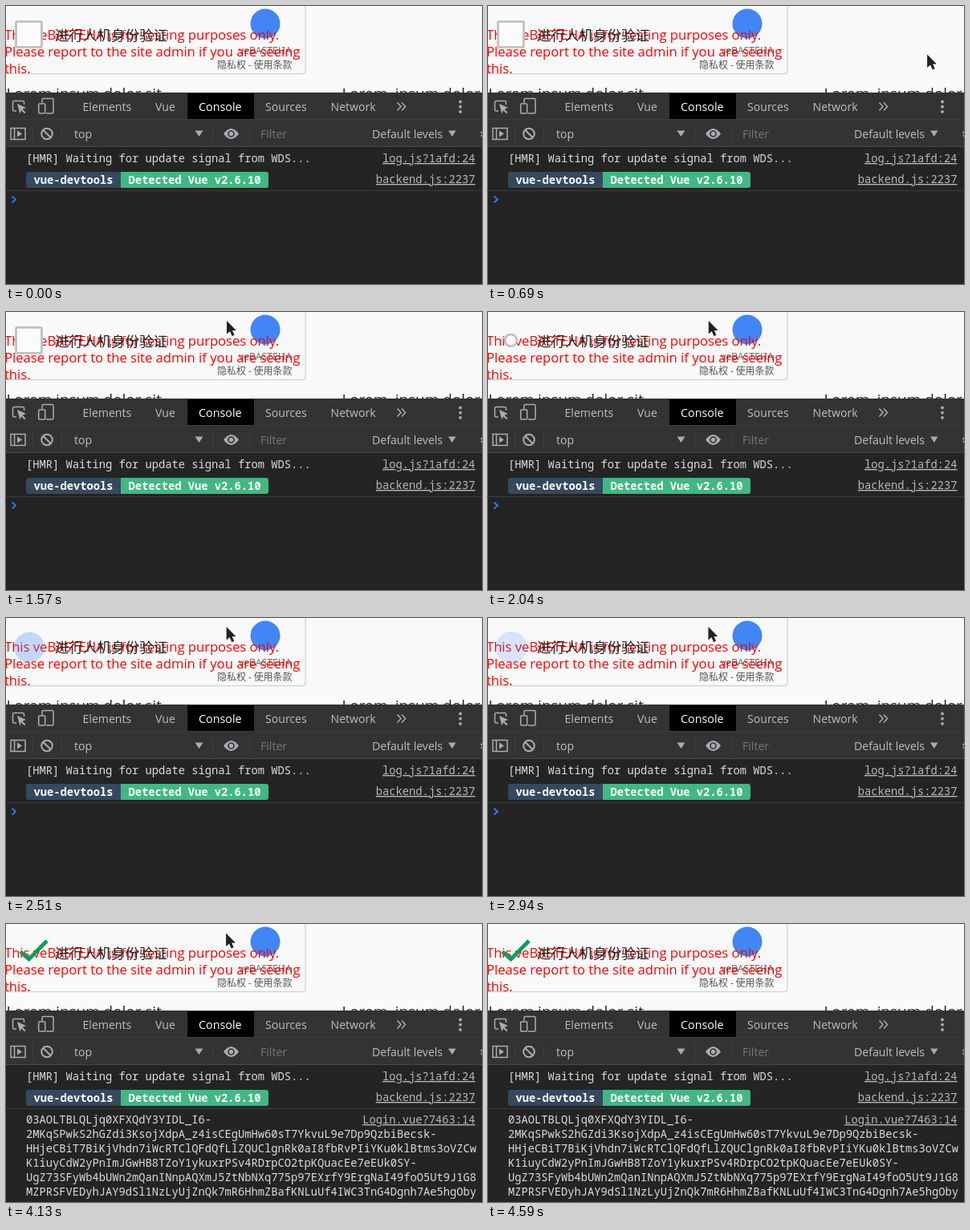
Recreate the animation shown at these times as an HTML page. Size 593 by 347 pixels, loop 5290 ms.

```html
<!DOCTYPE html>
<html lang="zh-CN">
<head>
<meta charset="utf-8">
<title>Console log</title>
<style>
html, body { margin: 0; width: 100%; height: 100%; overflow: hidden; background: #fafafa; }
svg { display: block; width: 593px; height: 347px; }
text { font-family: "Open Sans", "Noto Sans", sans-serif; white-space: pre; }
.cjk { font-family: "Noto Sans CJK SC", "Noto Sans CJK", sans-serif; }
.warn { font-size: 16.6px; fill: #f00; }
.page { font-size: 18.9px; fill: #222; }
.tool { font-size: 14.1px; fill: #bcc0c4; }
.mono { font-family: "Noto Sans Mono", "DejaVu Sans Mono", monospace; font-size: 13.75px; font-weight: 500; fill: #dcdcdc; }
.link { fill: #b8b8b8; font-weight: 400; text-anchor: end; text-decoration: underline; }
.badge { fill: #fff; font-weight: 700; }
.icon { fill: none; stroke: #a9adb2; stroke-width: 1.5; }
.solid { fill: #a9adb2; }
.rule { stroke: #3d3d3d; fill: none; }
</style>
</head>
<body>
<svg viewBox="0 0 593 347">
  <rect width="593" height="347" fill="#fafafa"/>

  <!-- verification widget -->
  <rect x="-6" y="-6" width="379" height="91.5" rx="4" fill="#000" opacity=".07"/>
  <rect x="-6" y="-6" width="379" height="90.5" rx="3.5" fill="#f9f9f9" stroke="#cfcfcf" stroke-width="1.2"/>
  <circle cx="323" cy="22" r="18.5" fill="#4285f4"/>
  <text x="290" y="60" font-size="12.3" fill="#666">veBASTEHA</text>
  <text class="cjk" x="263" y="78" font-size="12" fill="#555">隐私权 - 使用条款</text>
  <g class="warn">
    <text x="-2" y="42">This veBASTEHA is for testing purposes only.</text>
    <text x="-2" y="63">Please report to the site admin if you are seeing</text>
    <text x="-2" y="84">this.</text>
  </g>
  <text class="cjk" x="61" y="43" font-size="17.5" fill="#222">进行人机身份验证</text>
  <rect id="box" fill="#fbfbfb" stroke="#c1c1c1" stroke-width="2.8"/>
  <circle id="disc" cx="29" cy="36.7" fill="#4285f4"/>
  <path id="check" d="M18 34.500L28.500 44L51 21" pathLength="100" fill="none" stroke="#0f9d58" stroke-width="4.8" stroke-dasharray="100 200"/>
  <text class="page" x="0.500" y="115.500">Lorem ipsum dolor sit</text>
  <text class="page" x="418.500" y="115.500">Lorem, ipsum dolor</text>

  <!-- developer tools -->
  <rect y="108" width="593" height="239" fill="#242424"/>
  <rect y="108" width="593" height="68" fill="#333"/>
  <rect x="226" y="109" width="83" height="32.500" fill="#000"/>
  <path class="rule" d="M0 141.500H593M33.500 149V170M69.500 149V170M257.500 149V170M303.500 149V170"/>
  <path class="rule" d="M0 175.500H593" style="stroke:#484848"/>
  <g class="tool">
    <text x="95.500" y="131">Elements</text>
    <text x="186" y="131">Vue</text>
    <text x="240" y="131" font-size="14.3" fill="#fff">Console</text>
    <text x="323" y="131">Sources</text>
    <text x="404.500" y="131">Network</text>
    <text x="85" y="165">top</text>
    <text x="317" y="165" fill="#777">Filter</text>
    <text x="456" y="165">Default levels</text>
  </g>
  <g class="icon">
    <path d="M13 131H10Q8.500 131 8.500 129.500V120Q8.500 118.500 10 118.500H21Q22.500 118.500 22.500 120V123"/>
    <path d="M45 121V117Q45 115.500 46.500 115.500H57.500Q59 115.500 59 117V132.500Q59 134 57.500 134H50"/>
    <rect x="40.700" y="122" width="8" height="12" rx="1"/>
    <path d="M6 152.500H24V166.500H6ZM10.500 152.500V166.500"/>
    <circle cx="51" cy="159.500" r="6.800" stroke-width="2"/>
    <path d="M46.200 154.700L55.800 164.300" stroke-width="2"/>
    <path d="M487.500 120.500L492 125.500L487.500 130.500M493 120.500L497.500 125.500L493 130.500"/>
    <circle cx="597.500" cy="159.500" r="5.500" stroke-dasharray="2.600 1.720"/>
  </g>
  <g class="solid">
    <path d="M14 122L25 127L20.500 128.700L24.500 132.700L23 134.200L19 130.200L17.300 134.500Z"/>
    <path d="M14 155.500L20 159.500L14 163.500Z"/>
    <path d="M235.500 155.500H245.500L240.500 163Z"/>
    <path d="M551 155.500H560.500L555.800 163Z"/>
    <path d="M271 159.500Q280.500 146.500 290 159.500Q280.500 172.500 271 159.500Z"/>
    <circle cx="566" cy="119.500" r="1.900"/><circle cx="566" cy="125.700" r="1.900"/><circle cx="566" cy="131.900" r="1.900"/>
  </g>
  <circle cx="280.500" cy="159.500" r="3.500" fill="none" stroke="#333" stroke-width="1.700"/>

  <path class="rule" d="M0 230.500H593"/>
  <text class="mono" x="25" y="195">[HMR] Waiting for update signal from WDS...</text>
  <text class="mono link" x="584.500" y="195">log.js?1afd:24</text>
  <path d="M143 207H28Q25 207 25 210V224Q25 227 28 227H143Z" fill="#35495e"/>
  <path d="M143 207H324Q327 207 327 210V224Q327 227 324 227H143Z" fill="#41b883"/>
  <text class="mono badge" x="34.500" y="221.500">vue-devtools</text>
  <text class="mono badge" x="152.500" y="221.500">Detected Vue v2.6.10</text>
  <text class="mono link" x="584.500" y="221">backend.js:2237</text>
  <path id="prompt" d="M7.500 237.500L12 241.500L7.500 245.500" fill="none" stroke="#367cf1" stroke-width="1.800"/>
  <g id="log">
    <text class="mono link" x="584.500" y="249">Login.vue?7463:14</text>
  </g>
  <path id="cursor" d="M0 0V16.500L4 13L6.600 19L9.600 17.700L7 12H11.800Z" fill="#222"/>
</svg>
<script>
const LOOP = 5290, LOG_AT = 3080;
const $ = id => document.getElementById(id);
const [box, disc, check, caret, log, cursor] =
  ["box", "disc", "check", "prompt", "log", "cursor"].map($);

const token = [
  "03AOLTBLQLjq0XFXQdY3YIDL_I6-",
  "2MKqSPwkS2hGZdi3KsojXdpA_z4isCEgUmHw60sT7YkvuL9e7Dp9QzbiBecsk-",
  "HHjeCBiT7BiKjVhdn7iWcRTClQFdQfLlZQUClgnRk0aI8fbRvPIiYKu0klBtms3oVZCw",
  "K1iuyCdW2yPnImJGwHB8TZoY1ykuxrPSv4RDrpCO2tpKQuacEe7eEUk0SY-",
  "UgZ73SFyWb4bUWn2mQanINnpAQXmJ5ZtNbNXq775p97EXrfY9ErgNaI49foO5Ut9J1G8",
  "MZPRSFVEDyhJAY9dSl1NzLyUjZnQk7mR6HhmZBafKNLuUf4IWC3TnG4Dgnh7Ae5hgOby"
];
token.forEach((line, i) => {
  const row = document.createElementNS("http://www.w3.org/2000/svg", "text");
  row.setAttribute("class", "mono");
  row.setAttribute("x", 25);
  row.setAttribute("y", 249 + i * 18);
  row.textContent = line;
  log.append(row);
});

// Tracks hold [time, value, ...] steps, joined linearly.
const tracks = {
  cursor: [[670, 562, 63], [800, 470, 47], [930, 400, 36], [1050, 344, 27], [1190, 313, 22],
    [1570, 275, 11], [4130, 274, 11], [4250, 283, 60], [4360, 303, 150], [4590, 334, 348]],
  box: [[1780, 0], [2270, 1]],
  disc: [[2320, 6, 0], [2510, 19, .29], [2790, 22, .24], [2890, 22, .24], [LOG_AT, 14, 0]],
  check: [[3110, 0], [3350, 71], [3450, 71], [3640, 100]]
};

function at(track, t) {
  const i = track.findIndex(step => step[0] > t);
  if (i === 0) return track[0].slice(1);
  if (i < 0) return track.at(-1).slice(1);
  const a = track[i - 1], b = track[i];
  const p = (t - a[0]) / (b[0] - a[0]);
  return a.slice(1).map((v, k) => v + (b[k + 1] - v) * p);
}

const show = (el, on) => el.style.display = on ? "" : "none";
function set(el, attrs) {
  for (const name in attrs) el.setAttribute(name, attrs[name]);
}

function draw(t) {
  const [x, y] = at(tracks.cursor, t);
  show(cursor, t >= 670 && t < 4590);
  set(cursor, { transform: `translate(${x} ${y})` });

  // The square rounds off while it shrinks away.
  const [p] = at(tracks.box, t);
  const size = 32 * (1 - p);
  show(box, p < 1);
  set(box, {
    x: 28.5 - size / 2, y: 35.3 - size / 2, width: size, height: size,
    rx: Math.min(size / 2, 1 + p * 20), opacity: Math.min(1, (1 - p) * 3)
  });

  const [r, alpha] = at(tracks.disc, t);
  set(disc, { r, opacity: alpha });

  const [drawn] = at(tracks.check, t);
  show(check, drawn > 0);
  set(check, { "stroke-dashoffset": 100 - drawn });

  show(log, t >= LOG_AT);
  show(caret, t < LOG_AT);
}

const start = performance.now();
function tick(now) {
  draw(Math.max(0, now - start) % LOOP);
  requestAnimationFrame(tick);
}
draw(0);
requestAnimationFrame(tick);
</script>
</body>
</html>
```
